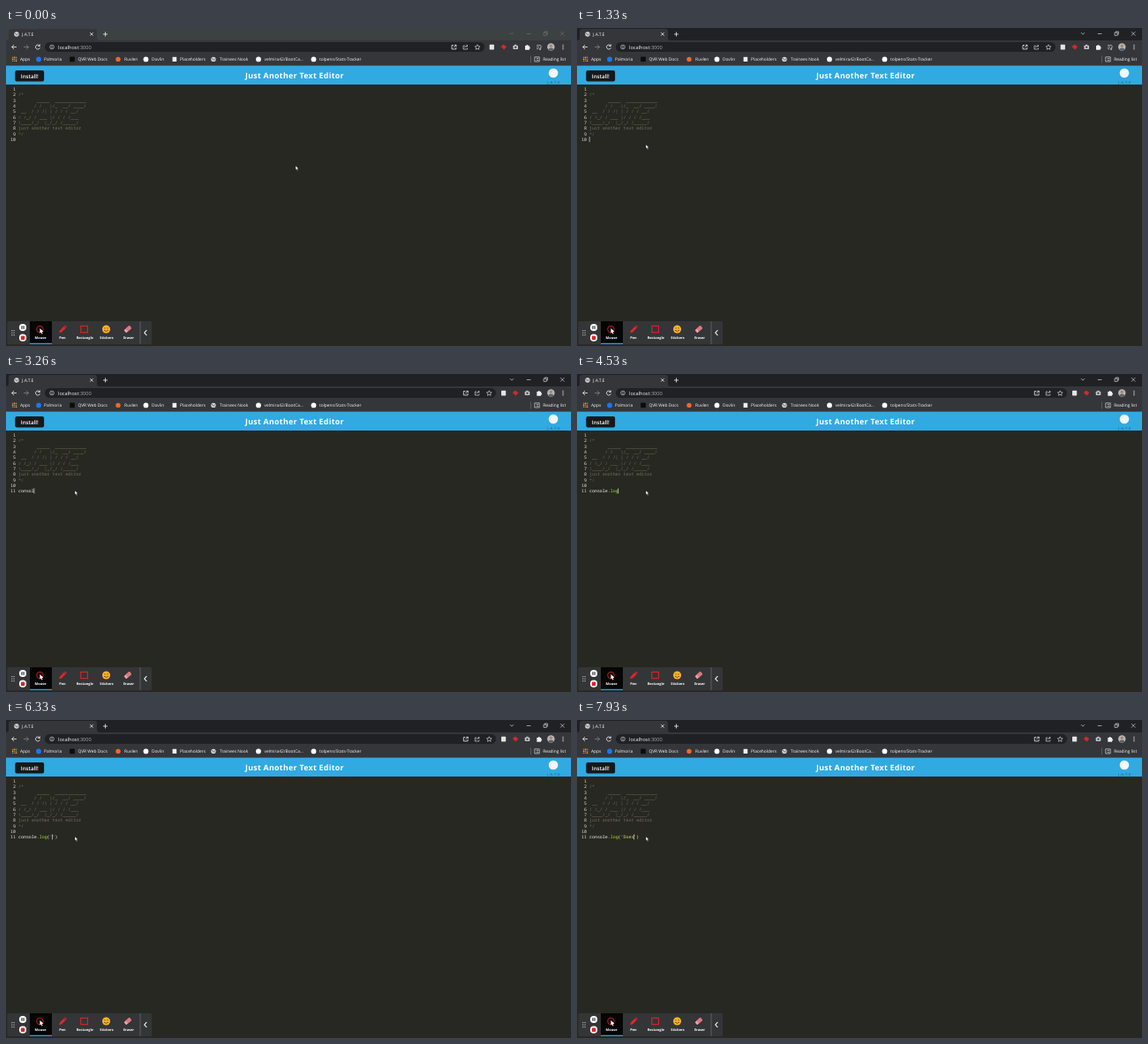
An HTML page that plays this animation: 640 px wide and 360 px high, repeating every 8 s.

```html
<!DOCTYPE html>
<html lang="en">
<head>
<meta charset="utf-8">
<title>Text editor demo</title>
<style>
  html, body { margin: 0; width: 100%; height: 100%; overflow: hidden; background: #272822; }
  svg { display: block; width: 100vw; height: 100vh; }
  text { font-family: "Open Sans", sans-serif; text-rendering: geometricPrecision; white-space: pre; }
  .code text { font: 500 4.95px "Noto Sans Mono", monospace; }
  .line { fill: none; stroke: #eceef0; stroke-width: .8; }
</style>
</head>
<body>
<svg id="stage" viewBox="0 0 640 360"></svg>
<script>
const LOOP = 8000, BLINK = 530;
const CODE_X = 14, CHAR = 2.97, LINE = 6.33;
const INK = '#f6f7f8', RED = '#e5252a';

const rect = (x, y, w, h, fill, rx = 0, more = '') =>
  `<rect x="${x}" y="${y}" width="${w}" height="${h}" fill="${fill}" rx="${rx}" ${more}/>`;
const dot = (x, y, r, fill) => `<circle cx="${x}" cy="${y}" r="${r}" fill="${fill}"/>`;
const ring = (x, y, r, more = '') => `<circle class="line" cx="${x}" cy="${y}" r="${r}" ${more}/>`;
const line = (d, more = '') => `<path class="line" d="${d}" ${more}/>`;
const text = (x, y, size, str, fill = INK, more = '') =>
  `<text x="${x}" y="${y}" font-size="${size}" fill="${fill}" ${more}>${str}</text>`;
const rowY = n => 70.9 + (n - 1) * LINE;
const globe = (x, y) => dot(x, y, 2.7, '#dadce0') +
  line(`M${x - 2} ${y - 1}l1.8 .8l-.4 1.4M${x + 2} ${y - .8}l-1.2 1l.3 1.2`, 'style="stroke:#55585c"');

function browserFrame() {
  const windowButtons = `<g id="controls">${
    line('M571 5.2l2 2l2-2M589.8 6.5h4.6M609 5.2h3.2v3.2h-3.2zM610.2 5v-1h3.2v3.2h-1M628 4.2l4.4 4.4m0-4.4l-4.4 4.4',
      'style="stroke-width:.6"')}</g>`;
  const tab = '<path d="M0 14q3 0 3-3v-7q0-3 3-3h94q3 0 3 3v7q0 3 3 3z" fill="#35363a"/>' +
    globe(12, 7) + text(18, 8.9, 5, 'J.A.T.E') +
    line('M95.2 5.2l3.4 3.4m0-3.4l-3.4 3.4M110 7h5M112.5 4.5v5');
  const navigation =
    line('M12 21.5h-5.4m2.5-2.5l-2.5 2.5l2.5 2.5') +
    line('M20 21.5h5.4m-2.5-2.5l2.5 2.5l-2.5 2.5', 'opacity=".4"') +
    line('M38 20a2.5 2.5 0 1 0 .4 2.3M38.3 18.5v2h-2');
  const address = rect(44, 16, 498, 11, '#202124', 5.5, 'id="address"') +
    ring(52, 21.5, 2.3, 'style="stroke-width:.6"') + line('M52 21v1.8M52 20v.5', 'style="stroke-width:.6"') +
    text(59, 23.5, 5.6, 'localhost<tspan fill="#a4a9ae">:3000</tspan>');
  const tools = `<g id="tools">${
    line('M507 19.5h-2v4.4h4.8v-1.8M508 19.3h2v2M509.8 19.4l-2.6 2.6') +
    line('M519.8 20h-1.8v4h4.6v-1.5M519.5 22.2q.4-2 3.4-2.1m-1.3-1.2l1.4 1.2l-1.4 1.3', 'style="stroke-width:.6"') +
    line('M534 18.8l.9 1.9l2 .2l-1.5 1.4l.4 2l-1.8-1l-1.8 1l.4-2l-1.5-1.4l2-.2z', 'style="stroke-width:.6"') +
    rect(547.7, 18.8, 5.2, 5.6, '#e4e4e4', .6) +
    '<path d="M560.6 21.3l2.8-2.7l3.6 2.6l-2.8 3.2z" fill="#cf2b2b"/>' +
    rect(574.4, 19.7, 5.6, 4.3, '#c6c8ca', .7) + rect(576, 18.8, 2.2, 1.2, '#c6c8ca') + dot(577.2, 21.8, 1.2, '#4a4c50') +
    '<path d="M588 20h1.4a1 1 0 1 1 2 0h1.4v1.5a1 1 0 1 1 0 2v1.2h-4.8z" fill="#eceef0"/>'
  }</g><g id="media" opacity=".7">${line('M601 19.5h5M601 21.5h3M601 23.5h2.5M605.7 24v-3h1.4') + dot(605, 24, .9, INK)}</g>`;
  const profile = dot(617.3, 21.5, 4.2, '#b4bab9') + dot(617.3, 20.3, 1.8, '#b1836c') +
    '<path d="M614.2 24.3a3.2 2.5 0 0 1 6.2 0a4.2 4.2 0 0 1-6.2 0z" fill="#596068"/>' +
    [19.3, 21.5, 23.7].map(y => dot(631, y, .65, INK)).join('');
  return rect(0, 0, 640, 14, '#202124', 0, 'id="strip"') + rect(0, 14, 640, 29, '#35363a') +
    windowButtons + tab + navigation + address + tools + profile;
}

function bookmarks() {
  const label = (x, str) => text(x, 37.1, 4.85, str);
  const appColors = ['#e8534a', '#f0b429', '#58a55c'];
  let out = '';
  for (let i = 0; i < 9; i++)
    out += rect(6.9 + i % 3 * 2, 32.6 + (i / 3 | 0) * 2, 1.4, 1.4, appColors[(i + (i / 3 | 0)) % 3]);
  out += dot(37, 35.4, 2.9, '#1877f2') + rect(72.2, 32.6, 5.6, 5.6, '#0c0c0c') +
    dot(127, 35.4, 2.7, '#f2672a') + dot(158.5, 35.4, 2.9, '#fff') +
    rect(188.6, 32.8, 4.6, 5.2, '#f1f1f1') + globe(235, 35.4) +
    dot(286, 35.4, 2.9, '#fff') + dot(348.5, 35.4, 2.9, '#fff');
  out += [[16, 'Apps'], [43, 'Palmoria'], [81.5, 'QVR Web Docs'], [134, 'Ruvlen'], [165, 'Dovlin'],
    [197, 'Placeholders'], [242, 'Trainees Nook'], [292.5, 'velmira42/BootCa...'],
    [355, 'tolpens/Stats-Tracker'], [608.2, 'Reading list']].map(b => label(...b)).join('');
  return out + line('M594.5 31.5v8', 'opacity=".25"') +
    line('M598.8 32.8h5.4v5.2h-5.4zM600.8 34.4h2.4M600.8 36.4h2.4', 'style="stroke-width:.6"');
}

function header() {
  return rect(0, 42.6, 640, 21.4, '#31a9e1') + rect(10.3, 48, 32.8, 12.5, '#16181a', 2) +
    text(26.8, 56.6, 6.2, 'Install!', '#fff', 'text-anchor="middle" font-weight="600"') +
    text(326.9, 57.3, 8.8, 'Just Another Text Editor', '#fff', 'text-anchor="middle" font-weight="700" letter-spacing=".3"') +
    dot(620, 51, 5.3, '#f2f8fb') +
    text(620.5, 62.6, 3.8, 'J.A.T.E', '#14506f', 'text-anchor="middle" letter-spacing=".7"');
}

function editor() {
  const comment = ['/*',
    '       _____  ____________',
    '      / /   |/_  __/ ____/',
    ' __  / / /| | / / / __/',
    '/ /_/ / ___ |/ / / /___',
    '\\____/_/  |_/_/ /_____/',
    'just another text editor',
    '*/'];
  let out = rect(0, 64, 640, 296, '#272822');
  for (let n = 1; n <= 11; n++)
    out += text(11, rowY(n), 4.95, n, '#e4e4e0', `text-anchor="end" ${n === 11 ? 'id="lastNumber"' : ''}`);
  comment.forEach((str, i) => out += text(CODE_X, rowY(i + 2), 4.95, str, '#75715e'));
  out += `<text id="typed" x="${CODE_X}" y="${rowY(11)}"></text>`;
  return `<g class="code">${out}</g>` + rect(0, 0, .6, 6, '#f8f8f0', 0, 'id="caret"');
}

function recorder() {
  const label = (x, str) => text(x, 352.2, 3.9, str, '#fff', 'text-anchor="middle" font-weight="700"');
  let out = rect(1.3, 332, 163.7, 26.2, '#343537', 1.5) + rect(27, 332, 25, 26.2, '#050505') +
    rect(27, 356.7, 25, 1.3, '#2b9fe8');
  for (let i = 0; i < 6; i++) out += dot(6.8 + i % 2 * 2.3, 342.6 + (i >> 1) * 2.5, .7, '#c8c8c8');
  out += dot(19, 339, 4.1, '#fff') + rect(17.4, 337.2, 1.1, 3.6, '#222') + rect(19.5, 337.2, 1.1, 3.6, '#222') +
    dot(19, 350.7, 4.1, '#fff') + rect(16.8, 348.5, 4.4, 4.4, RED, .6);
  out += ring(38.4, 341, 3.8, `style="stroke:${RED}"`) +
    '<path d="M38.4 340l4 3.8l-1.9.2l1 2l-.9.4l-1-2l-1.2 1.2z" fill="#fff"/>' +
    `<path d="M60.2 345l.7-2.6l4.7-4.7l2 2l-4.7 4.7zM66.1 337.2l.8-.7l2 2l-.8.7z" fill="${RED}"/>` +
    rect(84.8, 337.3, 7.6, 7.4, 'none', 0, `stroke="${RED}" stroke-width="1"`);
  out += dot(113.5, 341, 4.5, '#fbb42c') + dot(112, 339.8, .65, '#4a2d08') + dot(115, 339.8, .65, '#4a2d08') +
    line('M111 342.2q2.5 2.2 5 0', 'style="stroke:#5a2d0c"');
  out += `<g transform="rotate(-42 138 341)">${rect(133.8, 339, 8.2, 4, '#f2a0a5', .7) + rect(136.4, 339, 5.6, 4, '#d9787f', .7)}</g>`;
  out += [[39, 'Mouse'], [64, 'Pen'], [89.3, 'Rectangle'], [114, 'Stickers'], [139, 'Eraser']].map(b => label(...b)).join('');
  return out + line('M152 332v26', 'style="stroke:#707173;stroke-width:.7"') +
    line('M159.4 342l-2.6 3l2.6 3', 'style="stroke:#fff;stroke-width:1.1"');
}

const pointer = '<path id="pointer" d="M0 0v4.6l1.1-1l.8 1.8l.9-.4l-.8-1.7h1.5z" fill="#fff" stroke="#111" stroke-width=".35"/>';
const stage = document.getElementById('stage');
stage.innerHTML = editor() + browserFrame() + bookmarks() + header() + recorder() + pointer;
const part = id => document.getElementById(id);
const set = (id, name, value) => part(id).setAttribute(name, value);
const show = (id, on) => set(id, 'visibility', on ? 'visible' : 'hidden');

const FOCUS = 1130, NEW_LINE = 2000, TOOLS_SHIFT = 2000;
const move = { from: [328, 156], to: [78, 132], start: 100, end: 1000 };
// Each key press: time, the code after it and the caret column.
const keys = [];
[2780, 2880, 2960, 3040, 3120, 3220, 3330, 3700, 3850, 3950, 4080].forEach((at, i) =>
  keys.push({ at, code: 'console.log'.slice(0, i + 1), column: i + 1 }));
keys.push({ at: 5000, code: 'console.log()', column: 12 });
[5900, 6900, 7150, 7350, 7600].forEach((at, i) =>
  keys.push({ at, code: `console.log('${'Does'.slice(0, i)}')`, column: 13 + i }));

const span = (str, fill) => `<tspan fill="${fill}">${str}</tspan>`;
function colored(code) {
  const [, object, method, call] = /^(\w*\.?)(\w*)(.*)$/.exec(code);
  return span(object, '#f8f8f2') + span(method, '#a6e22e') +
    call.split(/('.*')/).map((str, i) => span(str, i % 2 ? '#e6db74' : '#f8f8f2')).join('');
}

function pointerAt(t) {
  const k = Math.min(1, Math.max(0, (t - move.start) / (move.end - move.start)));
  const eased = k * k * (3 - 2 * k);
  return move.from.map((v, i) => v + (move.to[i] - v) * eased);
}

let shownCode = '';
function draw(t) {
  const key = keys.filter(k => k.at <= t).pop();
  const code = key ? key.code : '';
  if (code !== shownCode) part('typed').innerHTML = colored(shownCode = code);

  const focused = t >= FOCUS, hasLine = t >= NEW_LINE, shifted = t >= TOOLS_SHIFT;
  const lastInput = key ? key.at : hasLine ? NEW_LINE : FOCUS;
  show('caret', focused && Math.floor((t - lastInput) / BLINK) % 2 === 0);
  set('caret', 'x', CODE_X - .2 + (key ? key.column : 0) * CHAR);
  set('caret', 'y', rowY(hasLine ? 11 : 10) - 4.8);
  show('lastNumber', hasLine);

  set('strip', 'fill', focused ? '#202124' : '#3b4241');
  set('controls', 'opacity', focused ? 1 : .3);
  set('tools', 'transform', `translate(${shifted ? 13.3 : 0})`);
  set('address', 'width', shifted ? 511 : 498);
  show('media', !shifted);
  set('pointer', 'transform', `translate(${pointerAt(t)})`);
}

const start = performance.now();
function tick() {
  draw((performance.now() - start) % LOOP);
  requestAnimationFrame(tick);
}
tick();
</script>
</body>
</html>
```
